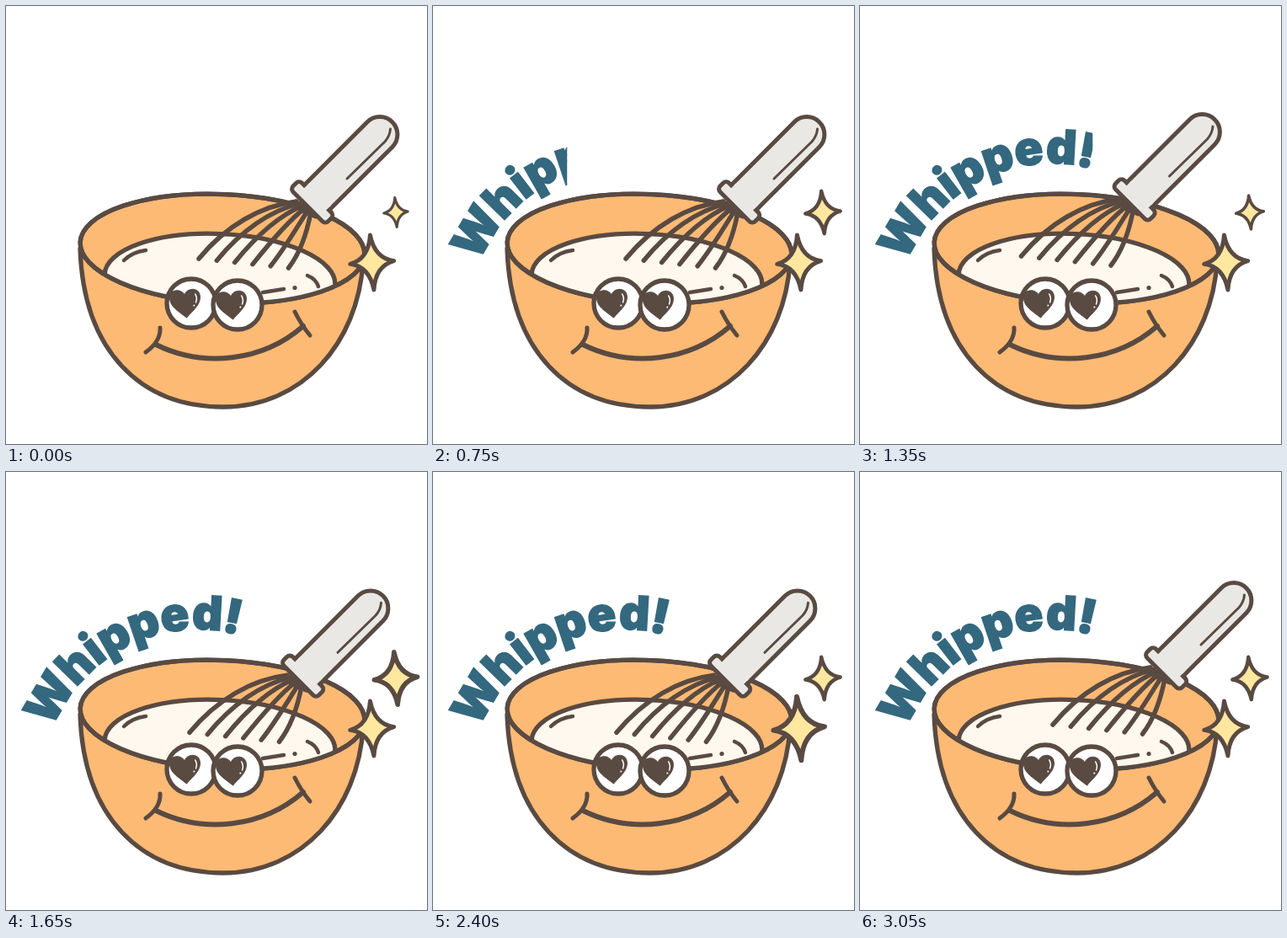
An HTML page with a canvas for the animation above (3.1 s loop, 500 px wide and 520 px high).

```html
<!DOCTYPE html>
<html lang="en">
<head>
<meta charset="utf-8">
<title>Whipped!</title>
<style>
  html, body { margin: 0; width: 100%; height: 100%; overflow: hidden; background: #fff; }
  canvas { display: block; width: 500px; height: 520px; }
</style>
</head>
<body>
<canvas id="stage" width="500" height="520"></canvas>
<script>
const ctx = document.getElementById('stage').getContext('2d');
const LOOP = 3100, STEP = 50, POSE = 125, TAU = Math.PI * 2;
const INK = '#594a42', ORANGE = '#fdba74', CREAM = '#fff8ee';
const METAL = '#e9e8e4', YELLOW = '#ffe7a0', TEAL = '#34687f';
const TILT = 0.0447;
const rad = d => d * Math.PI / 180;

// Stirring poses, offsets from the rightmost one
const STIR = [[0, 0], [-11, 9.3], [-35, 10], [-55, 6], [-37.5, -3], [-14, -3.5]];

// Sparkle pulses: [ms from peak, scale]
const SMALL_PULSE = [[-450, 1], [-300, 0.69], [-150, 0.99], [0, 1.24], [50, 1.24], [100, 1.06], [150, 1]];
const LARGE_PULSE = [[-200, 1], [0, 1.6], [100, 1.33], [150, 1.17], [200, 1]];

// Letters with their angle on the arc
const WORD = [['W', -59.5], ['h', -45.7], ['i', -37.6], ['p', -29.6], ['p', -18.6], ['e', -7.9], ['d', 3.2], ['!', 11.8]];

function paint(path, fill, width = 5.3, stroke = INK) {
  if (fill) { ctx.fillStyle = fill; ctx.fill(path); }
  if (width) { ctx.strokeStyle = stroke; ctx.lineWidth = width; ctx.stroke(path); }
}

function oval(x, y, rx, ry = rx, turn = 0) {
  const p = new Path2D();
  p.ellipse(x, y, rx, ry, turn, 0, TAU);
  return p;
}

const line = (d, width) => paint(new Path2D(d), null, width);

function keyed(keys, t) {
  if (t <= keys[0][0]) return keys[0][1];
  for (let i = 1; i < keys.length; i++) {
    const [a, va] = keys[i - 1], [b, vb] = keys[i];
    if (t <= b) return va + (vb - va) * (t - a) / (b - a);
  }
  return keys[keys.length - 1][1];
}

// Pulse that repeats every 1300 ms around its peak
function pulse(keys, peak, t) {
  const rel = ((t - peak + 600) % 1300 + 1300) % 1300 - 600;
  return keyed(keys, rel);
}

const rim = oval(257, 288, 169, 64.5, TILT);
const body = new Path2D('M88 288 C92 410 160 476 258 476 C352 476 418 400 424 304');

function drawBowl() {
  paint(body, ORANGE);
  paint(rim, ORANGE);
  ctx.save();
  ctx.clip(rim);
  paint(oval(254, 324.5, 137, 54, TILT), CREAM);
  ctx.restore();
  paint(rim, null);
  line('M140 302 Q150 292 166 290', 4.5);
  line('M358 320 Q368 324 371 333', 4.5);
  line('M305 340 L330 336', 4.5);
  paint(oval(343, 334.5, 2.6), INK, 0);
}

function drawWhisk([dx, dy]) {
  ctx.save();
  ctx.translate(dx, dy);
  for (let i = 0; i < 6; i++) {
    const k = i / 5;
    const x = 229 + 106.5 * k, y = 300 + 11 * k;
    const sx = 345 + 17 * k, sy = 232 + 13 * k;
    const ax = 303 + 55 * k, ay = 237 + 29 * k;
    const bx = 261 + 90 * k, by = 261 + 30 * k;
    line(`M${sx} ${sy} C${ax} ${ay} ${bx} ${by} ${x} ${y}`, 5.5);
  }
  paint(new Path2D('M344 231 L368 251 L349 243 Z'), INK, 3);

  ctx.save();
  ctx.translate(364, 232.5);
  ctx.rotate(-Math.PI / 4);
  const grip = new Path2D();
  grip.moveTo(0, -21);
  grip.lineTo(113, -21);
  grip.arc(113, 0, 21, -Math.PI / 2, Math.PI / 2);
  grip.lineTo(0, 21);
  paint(grip, METAL, 5);
  const collar = new Path2D();
  collar.roundRect(-8, -29.5, 15, 59, 5);
  paint(collar, METAL, 5);
  ctx.fillStyle = METAL;
  ctx.fillRect(1, -18.5, 12, 37);
  ctx.restore();

  line('M405 205 L450 161 Q456 154 456.5 146', 3);
  ctx.restore();
}

const heart = new Path2D('M0 18 C-8 10 -18 4 -18 -6 C-18 -17 -5 -18 0 -9 C4 -18 18 -17 18 -6 C18 4 8 10 0 18 Z');

function drawEye(x, y) {
  paint(oval(x, y, 29), '#fff');
  ctx.save();
  ctx.translate(x - 7, y - 1);
  ctx.rotate(rad(-5));
  paint(heart, INK, 1);
  paint(new Path2D('M12.5 -9 Q15 -4 12.5 1'), null, 1.5, '#fff');
  paint(oval(10, 4.5, 1), '#fff', 0);
  ctx.restore();
}

function drawFace() {
  drawEye(220, 353);
  drawEye(275, 355);
  line('M178 402 C235 430 305 422 353 380', 6);
  line('M183 382 Q184 398 166 411', 5);
  line('M343 363 Q351 379 361 391', 5);
}

function drawSparkle(x, y, w, h, width, scale) {
  const a = w * 0.14, b = h * 0.14;
  ctx.save();
  ctx.translate(x, y);
  ctx.rotate(rad(-4));
  ctx.scale(scale, scale);
  paint(new Path2D(`M0 ${-h} Q${a} ${-b} ${w} 0 Q${a} ${b} 0 ${h} Q${-a} ${b} ${-w} 0 Q${-a} ${-b} 0 ${-h} Z`), YELLOW, width);
  ctx.restore();
}

function drawWord(edge) {
  ctx.save();
  ctx.beginPath();
  ctx.rect(0, 0, edge, 520);
  ctx.clip();
  ctx.fillStyle = ctx.strokeStyle = TEAL;
  ctx.lineWidth = 1.5;
  ctx.lineJoin = 'miter';
  ctx.miterLimit = 3;
  ctx.font = '900 56px Inter, "Open Sans", sans-serif';
  ctx.textAlign = 'center';
  ctx.textBaseline = 'alphabetic';
  for (const [letter, angle] of WORD) {
    ctx.save();
    ctx.translate(228, 372);
    ctx.rotate(rad(angle));
    ctx.fillText(letter, 0, -185);
    ctx.strokeText(letter, 0, -185);
    ctx.restore();
  }
  ctx.restore();
}

function draw(t) {
  ctx.fillStyle = '#fff';
  ctx.fillRect(0, 0, 500, 520);
  ctx.lineCap = ctx.lineJoin = 'round';
  drawBowl();
  drawWhisk(STIR[Math.floor(t / POSE) % STIR.length]);
  drawFace();
  drawSparkle(463, 245, 20.7, 25.2, 4.5, pulse(SMALL_PULSE, 300, t));
  drawSparkle(434.7, 304.5, 26, 32.5, 5, pulse(LARGE_PULSE, 950, t));
  drawWord(13 + 0.195 * t);
}

const start = performance.now();
function tick() {
  const t = (performance.now() - start) % LOOP;
  draw(Math.floor(t / STEP) * STEP);
  requestAnimationFrame(tick);
}
tick();
</script>
</body>
</html>
```
